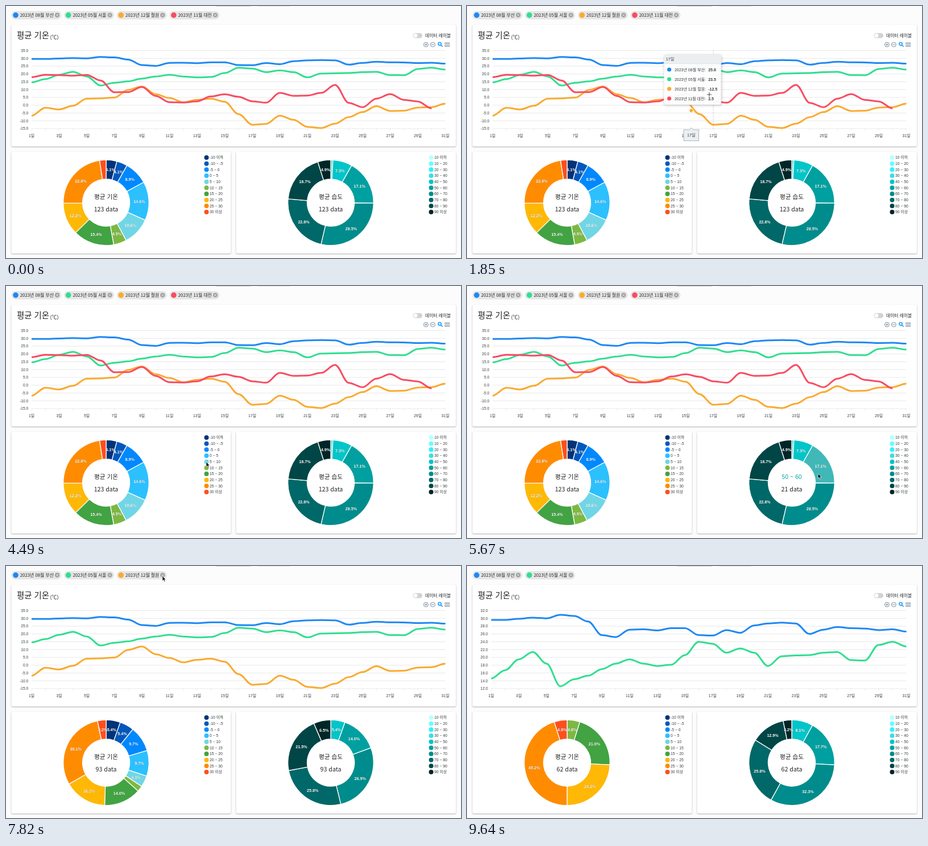
Recreate the animation shown at these times as an HTML page. Size 800 by 444 pixels, loop 9.67 s.

```html
<!DOCTYPE html>
<html lang="ko">
<head>
<meta charset="utf-8">
<title>평균 기온</title>
<style>
html, body { margin: 0; width: 100%; height: 100%; overflow: hidden; background: #fcfcfc; }
svg { display: block; width: 100vw; height: 100vh; }
text { font-family: 'Noto Sans CJK KR', 'Noto Sans CJK', sans-serif; fill: #222; }
.h, .h text { font-family: 'Liberation Sans', 'Noto Sans CJK KR', 'Noto Sans CJK', sans-serif; fill: #373d3f; }
.m { text-anchor: middle; }
.e { text-anchor: end; }
.card { fill: #fff; filter: drop-shadow(0 1px 1.3px rgba(0,0,0,.3)); }
.chip { font-size: 7.8px; font-weight: 500; }
.pct { filter: drop-shadow(.7px .7px .5px rgba(0,0,0,.5)); }
.pct text { font: bold 7.2px 'Liberation Sans', sans-serif; fill: #fff; text-anchor: middle; }
.tip { filter: drop-shadow(1px 1px 2px rgba(0,0,0,.22)); }
</style>
</head>
<body>
<svg viewBox="0 0 800 444">
  <g id="base"></g><g id="chips"></g><g id="chart"></g><g id="pies"></g><g id="over"></g>
</svg>
<script>
const LOOP = 9670;
const TOP = 78.5, BOTTOM = 216, RIGHT = 772.5;
const LINE_AT = [0, 7000, 8236], PIE_AT = [0, 7050, 8302], ANIM = 350;

const series = [
  { name: '2023년 08월 부산', color: '#1e88f5', data: [29.6, 29.6, 29.9, 30.2, 30, 30.9, 30.6, 29.2, 25.7, 25.2, 27.1, 27.2, 26.9, 27.5, 27.5, 25.7, 25.6, 27, 26.3, 28.2, 28.7, 28.9, 28.7, 26, 27.1, 27.8, 27.5, 27.4, 27, 27.2, 26.6] },
  { name: '2023년 05월 서울', color: '#30de90', data: [14.6, 16.7, 19.5, 21.4, 18.4, 12.6, 14.4, 15.3, 17, 18.4, 19.5, 18.4, 17.8, 18.1, 20.6, 24, 23.5, 21.2, 22.3, 21.2, 17.8, 20.3, 20.5, 20.6, 21.2, 21.4, 19.3, 19.2, 23.2, 24, 22.8] },
  { name: '2023년 12월 철원', color: '#faaa30', data: [-6.7, -1.6, -2.7, -.4, 4.2, 4.4, 4.9, 9.8, 12, 7, 4.6, 1.8, 3.5, 4.2, 2.2, -5.7, -12.5, -12, -6.7, -9.4, -13.9, -14.6, -11.8, -7.6, -4.4, -.6, -3.7, -3.5, -1.5, -1.3, 1] },
  { name: '2023년 11월 대전', color: '#f94b62', data: [18, 19.5, 19.3, 18.9, 19.4, 15.8, 8.3, 8.4, 11.6, 5.9, 1.9, 1.7, 2.5, 5.6, 7, 5.4, 2.5, 1.6, 7.9, 6, 6.2, 7.9, 13, 1.5, -1.3, 4.2, 7.1, 3.4, 2.4, -2] }
];

// Axis of each stage: left edge, highest value, lowest value
const axes = [[45, 35, -15], [45, 35, -15], [42.5, 32, 12]];

const pies = [
  { x: 176, y: 346.5, title: '평균 기온', legendX: 352.5,
    names: ['-10 이하', '-10 ~ -5', '-5 ~ 0', '0 ~ 5', '5 ~ 10', '10 ~ 15', '15 ~ 20', '20 ~ 25', '25 ~ 30', '30 이상'],
    colors: ['#003377', '#0057bd', '#0088ff', '#2cc0ff', '#70d6e6', '#7db843', '#42a343', '#ffb805', '#ff8c00', '#ff4f1c'],
    stages: [[5, 5, 11, 18, 13, 6, 19, 15, 28, 3], [5, 5, 9, 9, 4, 2, 13, 15, 28, 3], [0, 0, 0, 0, 0, 3, 13, 15, 28, 3]] },
  { x: 571, y: 346.5, title: '평균 습도', legendX: 747.5,
    names: ['10 이하', '10 ~ 20', '20 ~ 30', '30 ~ 40', '40 ~ 50', '50 ~ 60', '60 ~ 70', '70 ~ 80', '80 ~ 90', '90 이상'],
    colors: ['#b8ffff', '#66ffff', '#33f0ff', '#40dde0', '#00c5c9', '#00a0a0', '#008c8c', '#006868', '#004646', '#002628'],
    stages: [[0, 0, 0, 1, 9, 21, 35, 28, 23, 6], [0, 0, 0, 0, 5, 13, 25, 24, 20, 6], [0, 0, 0, 0, 5, 11, 20, 16, 8, 2]] }
];

// Pointer path: time, x, y
const path = [
  [950, 100, 150], [1500, 330, 152], [1774, 362, 154], [1794, 426, 156], [1850, 426, 156],
  [2100, 560, 150], [2400, 640, 160], [2700, 400, 240], [3000, 180, 292], [3210, 170, 286],
  [3400, 172, 288], [3700, 215, 300], [4000, 236, 345], [4250, 300, 320], [4490, 352, 310],
  [4800, 353, 318], [5200, 560, 285], [5600, 620, 320], [5900, 600, 395], [6050, 520, 380],
  [6250, 480, 240], [6450, 367, 40], [6900, 365, 16], [7100, 365, 16], [7700, 275, 18],
  [8250, 275, 16], [8370, 272, -14]
];

const lerp = (a, b, u) => a + (b - a) * u;
const clamp = (v, a = 0, b = 1) => Math.min(b, Math.max(a, v));
const sum = a => a.reduce((p, c) => p + c, 0);
const r2 = v => Math.round(v * 100) / 100;
const swing = u => { const p = u - 1; return p * p * (2.70158 * p + 1.70158) + 1; };
const stageAt = (times, t) => t >= times[2] ? 2 : t >= times[1] ? 1 : 0;

const text = (x, y, size, s, extra = '') => `<text x="${r2(x)}" y="${r2(y)}" font-size="${size}" ${extra}>${s}</text>`;
const rect = (x, y, w, h, r, extra) => `<rect x="${r2(x)}" y="${y}" width="${w}" height="${h}" rx="${r}" ${extra}/>`;
const dot = (x, y, r, fill, extra = '') => `<circle cx="${r2(x)}" cy="${r2(y)}" r="${r}" fill="${fill}" ${extra}/>`;
const stroke = (d, color, w, extra = '') => `<path d="${d}" fill="none" stroke="${color}" stroke-width="${w}" ${extra}/>`;

const cache = {};
function put(id, html) {
  if (cache[id] === html) return;
  cache[id] = html;
  document.getElementById(id).innerHTML = html;
}

function base() {
  let s = rect(369, -5, 62, 6, 2, 'fill="#d2d2d2"') + rect(442, -5, 58, 6, 2, 'fill="#e4e4e4"');
  s += rect(9.5, 33, 781.5, 214.5, 2.5, 'class="card"');
  s += rect(9.5, 257, 386, 179, 2.5, 'class="card"') + rect(404.5, 257, 386.5, 179, 2.5, 'class="card"');
  s += text(19, 57.3, 14.4, '평균 기온') + text(77.5, 57.8, 9, '(℃)');
  s += rect(715.5, 47.8, 16.5, 8.6, 4.3, 'fill="#d2d2d2"') + dot(720, 52.1, 3.8, '#fff', 'stroke="#ccc" stroke-width=".5"');
  s += text(737, 55, 7.8, '데이터 레이블', 'font-weight="500"');
  const grey = '#6e8192';
  s += stroke('M734.4 68a4 4 0 1 0 8 0a4 4 0 1 0-8 0M736.2 68h4.4M738.4 65.8v4.4', grey, .9);
  s += stroke('M746.4 68a4 4 0 1 0 8 0a4 4 0 1 0-8 0M748.2 68h4.4', grey, .9);
  s += stroke('M760 66.7a2.6 2.6 0 1 0 5.2 0a2.6 2.6 0 1 0-5.2 0M764.6 68.8l3 3', '#008ffb', 1.4);
  s += stroke('M771 65.4h9.4M771 68h9.4M771 70.6h9.4', grey, 1.1);
  for (const p of pies) {
    s += '<g class="h">' + p.names.map((n, i) => {
      const y = 267 + i * 10.67;
      return dot(p.legendX, y, 4, p.colors[i]) + text(p.legendX + 5.5, y + 2.4, 6.8, n);
    }).join('') + '</g>';
  }
  return s;
}

function chips(count) {
  return series.slice(0, count).map((s, i) => {
    const x = 9.5 + i * 92.65, c = x + 80.5;
    return rect(x, 9, 88, 14.4, 7.2, 'fill="#e6e6e6"') + dot(x + 7.5, 16.1, 4.8, s.color)
      + text(x + 15.3, 19, 7.8, s.name, 'class="chip"') + dot(c, 16.1, 4.1, '#a3a3a3')
      + stroke(`M${c - 1.6} 14.5l3.2 3.2m0-3.2l-3.2 3.2`, '#eee', .9);
  }).join('');
}

const dayX = (axis, i) => lerp(axis[0], RIGHT, i / 30);
const valY = (axis, v) => lerp(TOP, BOTTOM, (axis[1] - v) / (axis[1] - axis[2]));

function curve(pts) {
  return pts.map(([x, y], i) => {
    if (!i) return `M${r2(x)} ${r2(y)}`;
    const [px, py] = pts[i - 1], k = (x - px) * .35;
    return `C${r2(px + k)} ${r2(py)} ${r2(x - k)} ${r2(y)} ${r2(x)} ${r2(y)}`;
  }).join('');
}

function chart(t) {
  const n = stageAt(LINE_AT, t), ax = axes[n], from = axes[Math.max(0, n - 1)];
  const e = swing(clamp((t - LINE_AT[n]) / ANIM));
  let s = '<g class="h">';
  for (let i = 0; i <= 10; i++) {
    const y = lerp(TOP, BOTTOM, i / 10);
    s += stroke(`M${ax[0]} ${y}H${RIGHT}`, '#e2e2e2', .8);
    s += text(ax[0] - 5.8, y + 2.4, 6.6, lerp(ax[1], ax[2], i / 10).toFixed(1), 'class="e h"');
  }
  for (let i = 0; i <= 30; i++) {
    const x = dayX(ax, i);
    s += stroke(`M${r2(x)} ${BOTTOM}v3.4`, '#e0e0e0', .7);
    if (i % 2 === 0) s += text(x, 230.6, 6.9, i + 1 + '일', 'class="m h"');
  }
  s += '</g>';
  for (const { data, color } of series.slice(0, 4 - n)) {
    const pts = data.map((v, i) => [lerp(dayX(from, i), dayX(ax, i), e), lerp(valY(from, v), valY(ax, v), e)]);
    s += stroke(curve(pts), color, 3);
  }
  return s;
}

const bounds = a => { const all = sum(a); let c = 0; return [0, ...a.map(v => (c += v) / all)]; };
const polar = (p, r, f) => [r2(p.x + r * Math.sin(f * 2 * Math.PI)), r2(p.y - r * Math.cos(f * 2 * Math.PI))];

function ring(p, a, b, out) {
  const big = b - a > .5 ? 1 : 0, inn = 41.5;
  return `M${polar(p, out, a)}A${out} ${out} 0 ${big} 1 ${polar(p, out, b)}L${polar(p, inn, b)}A${inn} ${inn} 0 ${big} 0 ${polar(p, inn, a)}Z`;
}

function hovered(p, edges, at) {
  if (!at) return -1;
  const dx = at.x - p.x, dy = at.y - p.y, d = Math.hypot(dx, dy);
  if (d < 42 || d > 75) return -1;
  const f = (Math.atan2(dx, -dy) / (2 * Math.PI) + 1) % 1;
  return p.names.findIndex((_, i) => f >= edges[i] && f < edges[i + 1]);
}

function pie(p, t, at) {
  const n = stageAt(PIE_AT, t), now = p.stages[n], total = sum(now);
  const u = clamp((t - PIE_AT[n]) / ANIM), moving = n > 0 && u < 1;
  const to = bounds(now), from = bounds(p.stages[Math.max(0, n - 1)]);
  const edges = to.map((v, i) => clamp(lerp(from[i], v, swing(u))));
  const hot = hovered(p, edges, at);
  let s = '', labels = '';
  p.colors.forEach((c, i) => {
    const a = edges[i], b = edges[i + 1];
    if (b - a > .0005) {
      const d = ring(p, a, b, 75.3);
      const line = moving ? '' : 'stroke="#fff" stroke-width="1.3"';
      s += `<path d="${d}" fill="${c}" ${line}/>`;
      if (i === hot) s += `<path d="${d}" fill="#fff" opacity=".25"/>`;
    }
    if (now[i] / total > 10 / 360) {
      const [x, y] = polar(p, 58.5, (to[i] + to[i + 1]) / 2);
      labels += text(x, y + 2.5, 7.2, (now[i] / total * 100).toFixed(1) + '%');
    }
  });
  s += `<g class="pct">${labels}</g>`;
  const name = hot < 0 ? p.title : p.names[hot];
  s += text(p.x, 340.3, 10.6, name, `class="m" style="fill:${hot < 0 ? '#222' : p.colors[hot]}"`);
  return s + text(p.x, 362, 10.6, (hot < 0 ? total : now[hot]) + ' data', 'class="m"');
}

function pointer(t) {
  const k = path.findIndex(q => q[0] > t);
  if (k < 1) return null;
  const a = path[k - 1], b = path[k];
  let u = (t - a[0]) / (b[0] - a[0]);
  u *= u * (3 - 2 * u);
  return { x: lerp(a[1], b[1], u), y: lerp(a[2], b[2], u) };
}

const inGrid = (at, ax) => at && at.x > ax[0] - 6 && at.x < RIGHT + 6 && at.y > TOP && at.y < BOTTOM;
const dayOf = (at, ax) => clamp(Math.round((at.x - ax[0]) / (RIGHT - ax[0]) * 30), 0, 30);

function tooltip(t, at, n) {
  const ax = axes[n], shown = series.slice(0, 4 - n), day = dayOf(at, ax);
  // The tips trail the pointer: average their targets over the last 150 ms
  let count = 0, x = 0, left = 0;
  const ys = shown.map(() => 0);
  for (let k = 0; k < 30; k++) {
    const q = pointer(t - k * 5);
    if (!inGrid(q, ax)) break;
    const d = dayOf(q, ax), dx = dayX(ax, d);
    count++;
    x += dx;
    left += dx < 366 ? dx + 13 : dx - 109;
    shown.forEach((s, i) => ys[i] += valY(ax, s.data[Math.min(d, s.data.length - 1)]));
  }
  x /= count;
  left /= count;
  const cx = r2(dayX(ax, day)), label = day + 1 + '일', h = 20 + shown.length * 17;
  let s = stroke(`M${cx} ${TOP}V${BOTTOM}`, '#b6b6b6', .8, 'stroke-dasharray="2 2"');
  shown.forEach((q, i) => {
    if (day < q.data.length) s += dot(x, ys[i] / count, 3.5, q.color, 'stroke="#fff" stroke-width="1"');
  });
  s += `<g class="h">` + `<path d="M${r2(x - 13.2)} 218h9.6l3.6-3.4l3.6 3.4h9.6v19.4h-26.4z" fill="#eceff1" stroke="#90a4ae" stroke-width=".8" stroke-linejoin="round"/>`;
  s += text(x, 230.3, 7.2, label, 'class="m h"');
  s += `<g class="tip">` + rect(left, 86, 100.5, h, 3, 'fill="#fff" fill-opacity=".96" stroke="#e3e3e3" stroke-width=".7"') + '</g>';
  s += `<path d="M${r2(left)} 101.5v-12.5q0-3 3-3h94.5q3 0 3 3v12.5z" fill="#eceff1"/>` + stroke(`M${r2(left)} 101.5h100.5`, '#ddd', .7);
  s += text(left + 3.6, 96.3, 7.2, label);
  shown.forEach((q, i) => {
    if (day >= q.data.length) return;
    const y = 112 + i * 17;
    s += dot(left + 9.4, y, 3.6, q.color) + text(left + 18.7, y + 2.6, 7, q.name + ':');
    s += text(left + 78, y + 2.6, 7, q.data[day].toFixed(1), 'font-weight="bold"');
  });
  return s + '</g>';
}

function over(t, at) {
  if (!at) return '';
  const n = stageAt(LINE_AT, t), x = r2(at.x), y = r2(at.y);
  if (inGrid(at, axes[n])) {
    const plus = `M${x - 4} ${y}h8M${x} ${y - 4}v8`;
    return tooltip(t, at, n) + stroke(plus, '#fff', 1.8) + stroke(plus, '#333', .9);
  }
  return `<path d="M${x} ${y}v8.6l2-1.9l1.5 3.3l1.5-.7l-1.5-3.1h2.7z" fill="#000" stroke="#fff" stroke-width=".7"/>`;
}

function draw(t) {
  const at = pointer(t);
  put('chips', chips(4 - stageAt(LINE_AT, t)));
  put('chart', chart(t));
  put('pies', pies.map(p => pie(p, t, at)).join(''));
  put('over', over(t, at));
}

put('base', base());
const start = performance.now();
function tick() {
  draw((performance.now() - start) % LOOP);
  requestAnimationFrame(tick);
}
tick();
</script>
</body>
</html>
```
